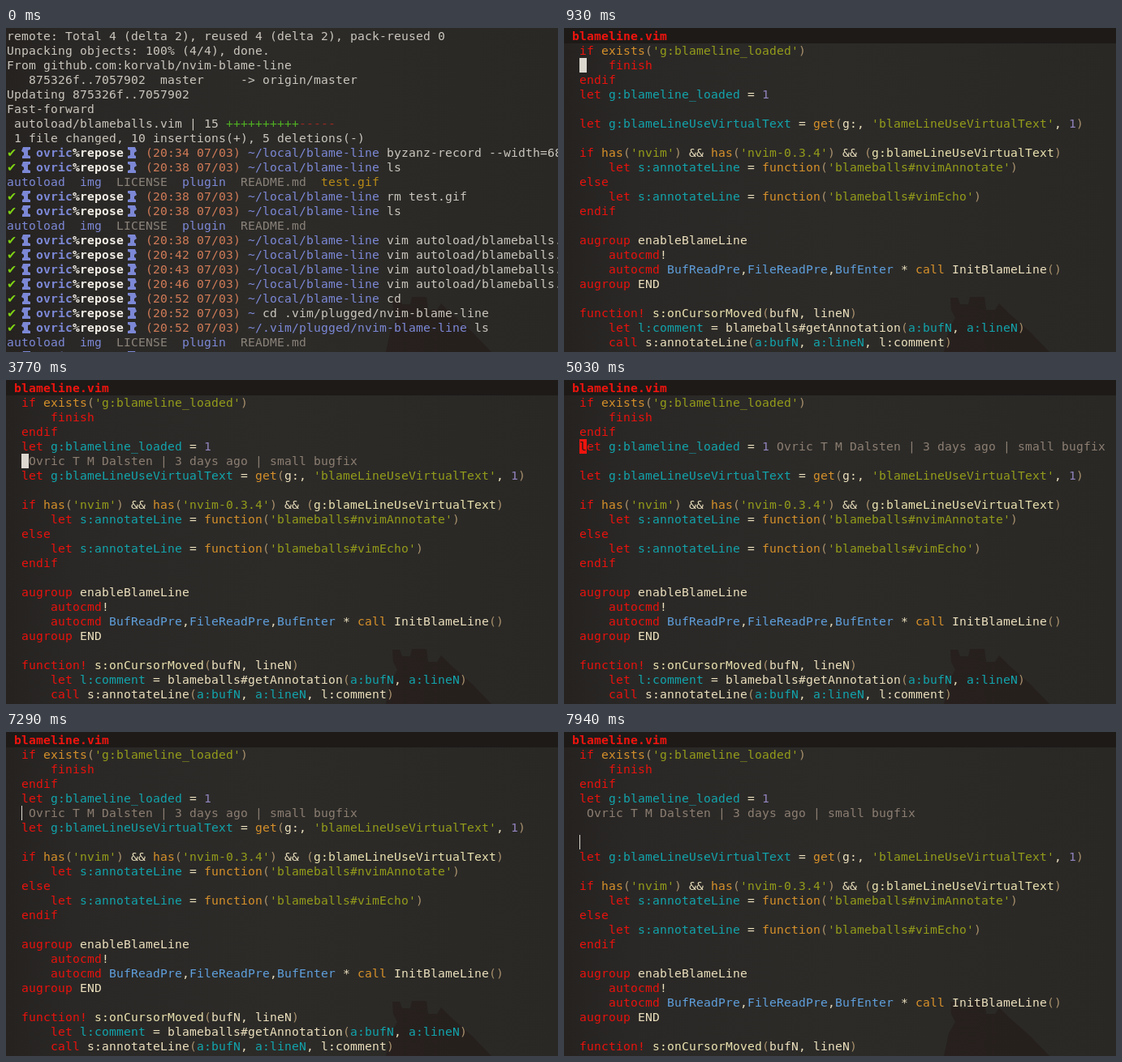
Animation of 680 by 400 pixels, one loop 8 s. Source, as an HTML page with a canvas:

```html
<!DOCTYPE html>
<html lang="en">
<head>
<meta charset="utf-8">
<title>Line blame in the editor</title>
<style>
html, body { margin: 0; width: 100%; height: 100%; overflow: hidden; background: #2a2927; }
canvas { display: block; }
</style>
</head>
<body>
<canvas id="stage" width="680" height="400"></canvas>
<script>
const ctx = document.getElementById('stage').getContext('2d');
const LOOP = 8000, CELL_W = 9, CELL_H = 18;

// Markup: {xtext} paints text in colour x; capitals are bold.
const COLORS = {
  w: '#ebdfbd', t: '#cac6bd', r: '#e8120d', o: '#d6902a', s: '#949c1a', i: '#12a4ac',
  n: '#9284be', b: '#5f9fdc', p: '#a8906c', y: '#ebe2b0', a: '#8c7e72',
  d: '#7c88d6', g: '#4fae22', m: '#9c2a20', c: '#d07b57', l: '#8a8279', f: '#b88a16', v: '#7fd214',
  R: '#f0140e', D: '#7c88d6', W: '#f2eee6'
};

const parse = (line, base) => {
  const cells = [];
  for (const [, key, marked, plain] of line.matchAll(/\{(\w)([^}]*)\}|([^{]+)/g))
    for (const char of marked ?? plain) cells.push({ char, key: key || base });
  return cells;
};

const prompt = (time, path, command) =>
  `{v✔}   {Dovric}{W%repose}   {c(${time} 07/03)} {d${path}} ${command}`;
const listing = '{dautoload}  {dimg}  {lLICENSE}  {dplugin}  {lREADME.md}';
const repo = '~/local/blame-line';
const plugin = '~/.vim/plugged/nvim-blame-line';
const edit = 'vim autoload/blameballs.vim';

const shell = [
  'remote: Total 4 (delta 2), reused 4 (delta 2), pack-reused 0',
  'Unpacking objects: 100% (4/4), done.',
  'From github.com:korvalb/nvim-blame-line',
  '   875326f..7057902  master     -> origin/master',
  'Updating 875326f..7057902',
  'Fast-forward',
  ' autoload/blameballs.vim | 15 {g++++++++++}{m-----}',
  ' 1 file changed, 10 insertions(+), 5 deletions(-)',
  prompt('20:34', repo, 'byzanz-record --width=680'),
  prompt('20:38', repo, 'ls'),
  listing + '  {ftest.gif}',
  prompt('20:38', repo, 'rm test.gif'),
  prompt('20:38', repo, 'ls'),
  listing,
  ...['20:38', '20:42', '20:43', '20:46'].map(time => prompt(time, repo, edit)),
  prompt('20:52', repo, 'cd'),
  prompt('20:52', '~', 'cd .vim/plugged/nvim-blame-line'),
  prompt('20:52', plugin, 'ls'),
  listing,
  prompt('20:52', plugin, '')
].map(line => parse(line, 't'));

const code = [
  "{rif} {oexists}{p(}{s'g:blameline_loaded'}{p)}",
  '    {rfinish}',
  '{rendif}',
  '{rlet} {ig:blameline_loaded} = {n1}',
  '',
  "{rlet} {ig:blameLineUseVirtualText} = {oget}{p(}g:, {s'blameLineUseVirtualText'}, {n1}{p)}",
  '',
  "{rif} {ohas}{p(}{s'nvim'}{p)} && {ohas}{p(}{s'nvim-0.3.4'}{p)} && {p(}{yg:blameLineUseVirtualText}{p)}",
  "    {rlet} {is:annotateLine} = {ofunction}{p(}{s'blameballs#nvimAnnotate'}{p)}",
  '{relse}',
  "    {rlet} {is:annotateLine} = {ofunction}{p(}{s'blameballs#vimEcho'}{p)}",
  '{rendif}',
  '',
  '{raugroup} enableBlameLine',
  '    {rautocmd}!',
  '    {rautocmd} {bBufReadPre},{bFileReadPre},{bBufEnter} * {ocall} InitBlameLine{p()}',
  '{raugroup} END',
  '',
  '{rfunction!} {ys:onCursorMoved}{p(}bufN, lineN{p)}',
  '    {rlet} {il:comment} = blameballs#getAnnotation{p(}{ia:bufN}, {ia:lineN}{p)}',
  '    {rcall} s:annotateLine{p(}{ia:bufN}, {ia:lineN}, l:comment{p)}'
].map(line => parse(line, 'w'));

const title = parse('{Rblameline.vim}', 'w');
const note = parse(' Ovric T M Dalsten | 3 days ago | small bugfix', 'a');

// Times at which the cursor reaches each row.
const moves = [[150, 1], [930, 2], [1650, 3], [1930, 4], [2270, 5], [5030, 4],
  [5250, 3], [6050, 4], [6230, 5], [7740, 6], [7940, 7]];
const NOTES_ON = 3770, INSERT_ON = 7290;

const rowTop = row => 1 + row * CELL_H;

function drawChar({ char, key }, x, row, color = COLORS[key]) {
  if (char === ' ') return;
  const weight = /[A-Z]/.test(key) ? 'bold' : 'normal';
  const family = char === '✔' ? '"DejaVu Sans", sans-serif' : '"DejaVu Sans Mono", monospace';
  ctx.font = `${weight} 11pt ${family}`;
  ctx.fillStyle = color;
  ctx.fillText(char, x, rowTop(row) + 14);
}

const drawLine = (cells, x, row) =>
  cells.forEach((cell, col) => drawChar(cell, x + col * CELL_W, row));

function drawBackdrop() {
  const shade = ctx.createLinearGradient(0, 0, 680, 0);
  shade.addColorStop(0, '#252220');
  shade.addColorStop(0.12, '#2a2826');
  shade.addColorStop(0.5, '#2c2b28');
  shade.addColorStop(1, '#292825');
  ctx.fillStyle = shade;
  ctx.fillRect(0, 0, 680, 400);
  ctx.fillStyle = 'rgba(34, 20, 18, 0.42)';
  ctx.fill(new Path2D('M468 400L474 372L482 358L477 348L476 333H485L488 341H498L500 332H518L520 348H531L536 340L548 352L575 376L598 400Z'));
}

const badge = new Path2D('M2 0H11V3L8 4V10L11 11V14H1V11L3 10V7L0 5Z');

function drawBadge(x, row, flip) {
  ctx.save();
  ctx.translate(x, rowTop(row) + 2);
  ctx.scale(flip, 1);
  ctx.fillStyle = COLORS.d;
  ctx.fill(badge);
  ctx.restore();
}

function drawShell() {
  shell.forEach((cells, row) => {
    drawLine(cells, 1, row);
    if (cells[0].char !== '✔') return;
    drawBadge(19, row, 1);
    drawBadge(161, row, -1);
  });
}

function drawEditor(t) {
  const row = moves.filter(([start]) => t >= start).pop()[1];
  const added = Array(Math.max(0, row - 5)).fill([]);
  const lines = [...code.slice(0, 5), ...added, ...code.slice(5)].slice(0, 21);

  ctx.fillStyle = '#1d1a18';
  ctx.fillRect(0, 0, 680, 19);
  drawLine(title, 10, 0);
  lines.forEach((cells, i) => drawLine(cells, 19, i + 1));

  if (t >= NOTES_ON) {
    const noteRow = Math.min(row, 5);
    drawLine(note, 19 + lines[noteRow - 1].length * CELL_W, noteRow);
  }

  const insert = t >= INSERT_ON;
  const under = lines[row - 1][0] || { char: ' ', key: 'w' };
  ctx.fillStyle = under.char === ' ' ? '#dcd8d0' : COLORS.R;
  ctx.fillRect(19, rowTop(row), insert ? 1 : CELL_W, CELL_H);
  if (!insert) drawChar(under, 19, row, '#1d1a18');
}

function render(now) {
  const t = now % LOOP;
  drawBackdrop();
  if (t < moves[0][0]) drawShell();
  else drawEditor(t);
  requestAnimationFrame(render);
}

render(0);
</script>
</body>
</html>
```
